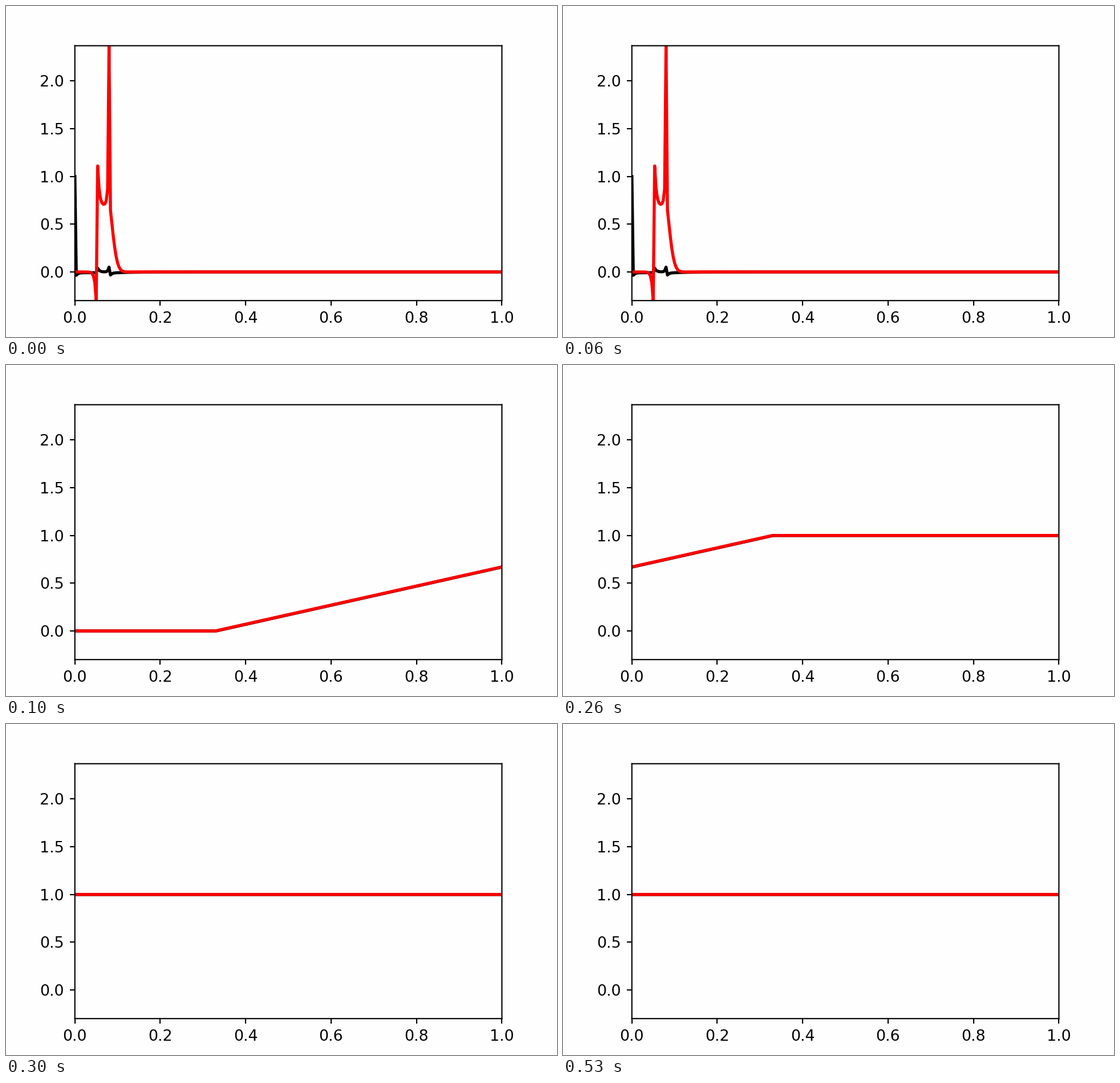
A matplotlib script that plays this animation: 966 by 580 pixels, repeating every 690 ms.

```python
import numpy as np
import matplotlib.pyplot as plt
from matplotlib.animation import FuncAnimation

DPI = 200
SCALE = 0.966  # a 5 x 3 inch figure fitted to the stage
STEP = 10      # ms per drawn frame
LOOP = 690
N = 300        # grid cells
A, B = 15, 24  # grid indices of the dip and of the peak

plt.rcParams.update({"font.size": 10 * SCALE, "axes.linewidth": 0.8 * SCALE})
for axis in ("xtick", "ytick"):
    plt.rcParams.update({
        f"{axis}.major.size": 3.5 * SCALE,
        f"{axis}.major.width": 0.8 * SCALE,
        f"{axis}.major.pad": 3.5 * SCALE,
    })

n = np.arange(N + 1)
x = n / N


def spikes():
    """A dip and a peak near the left edge, then a Gaussian tail."""
    left, mid, tail = n[:A + 1], n[A + 1:B + 1], n[B + 1:] - B - 1
    jump = np.exp(-0.8 * (mid - A - 1))
    red = np.concatenate([
        -0.3 * np.exp(left - A),
        0.68 + 0.43 * jump + 1.69 * np.exp(-2.2 * (B - mid) ** 0.6),
        0.647 * np.exp(-0.205 * tail - 0.0357 * tail ** 2),
    ])
    black = np.concatenate([
        -0.008 - 0.027 * np.exp((1 - left) / 1.2),
        0.04 * jump + 0.05 * np.exp(-1.4 * (B - mid)),
        -0.02 * np.exp(-tail) - 0.012 * np.exp(-tail / 12),
    ])
    black[0] = 1
    return black, red


def ramp(shift):
    return np.clip(x + shift, 0, 1)


def curves(step):
    """Black and red values; the ramp moves one axis width per step."""
    if step == 0:
        return spikes()
    shift = step - 1.329
    return ramp(shift - 0.002), ramp(shift)


fig, ax = plt.subplots(figsize=(966 / DPI, 580 / DPI), dpi=DPI,
                       facecolor="#fefefe")
fig.subplots_adjust(left=0.125, right=0.9, bottom=0.11, top=0.88)
ax.set_facecolor("#fefefe")
ax.set_xlim(0, 1)
ax.set_ylim(-0.3, 2.37)
ax.set_yticks(np.arange(0, 2.1, 0.5))
black_line, red_line = [
    ax.plot(x, y, color=color, lw=2 * SCALE)[0]
    for y, color in zip(curves(0), ("black", "red"))
]

# Keep fractional pixel positions
ticks = ax.xaxis.get_ticklines() + ax.yaxis.get_ticklines()
for part in [*ax.spines.values(), *ticks, black_line, red_line]:
    part.set_snap(False)


def update(i):
    black, red = curves(min(i * STEP // 100, 3))
    black_line.set_ydata(black)
    red_line.set_ydata(red)
    return black_line, red_line


anim = FuncAnimation(fig, update, frames=LOOP // STEP, interval=STEP,
                     repeat=True, repeat_delay=0)
plt.show()
```
